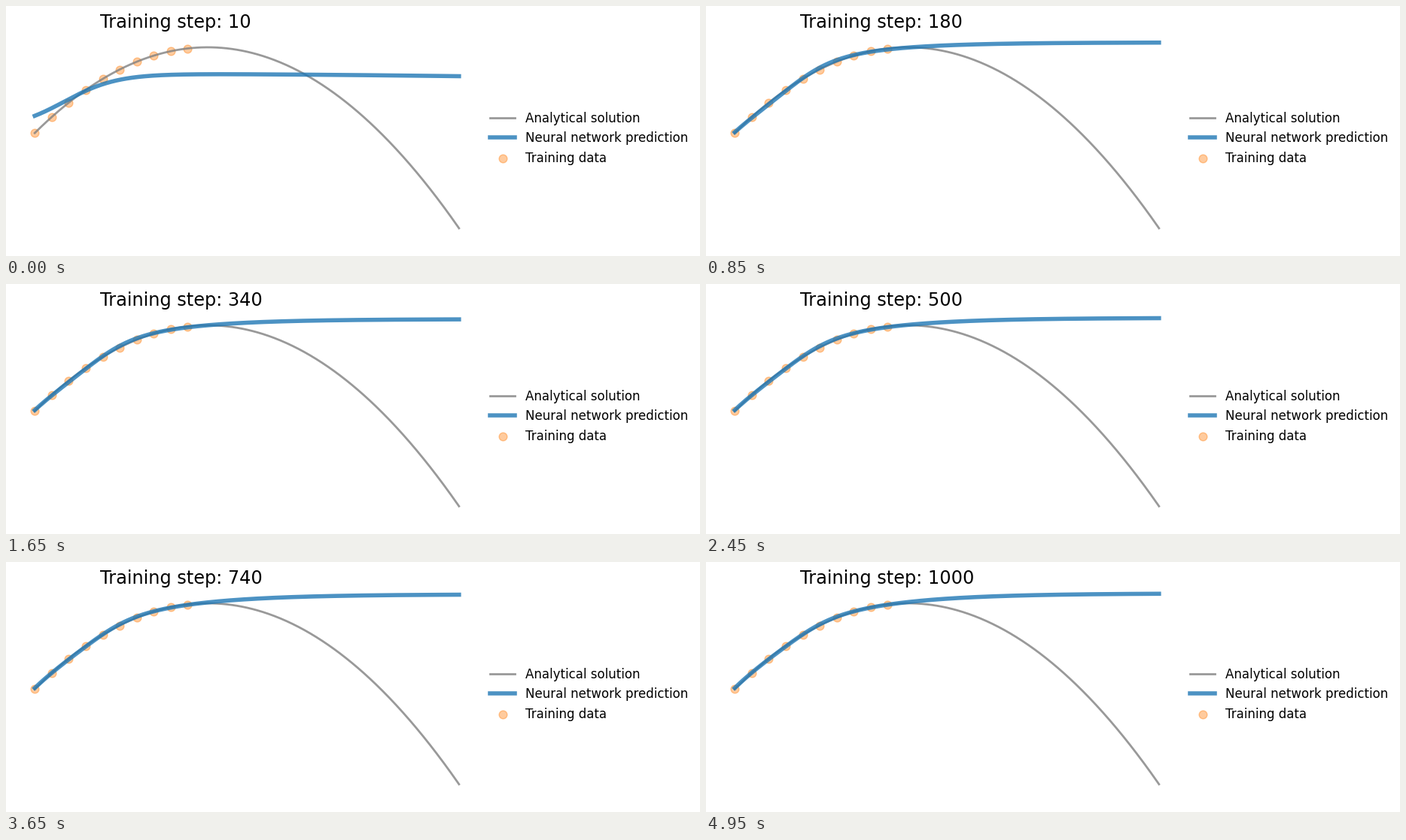
A matplotlib script for the animation above (5 s loop, 922x333 px).

```python
import numpy as np
import matplotlib.pyplot as plt
from matplotlib.animation import FuncAnimation

W, H, DPI = 922, 333, 100
FRAMES, INTERVAL = 100, 50
STEPS_PER_FRAME = 10
SETTLED, LAST = 180, FRAMES * STEPS_PER_FRAME

plt.rcParams["font.family"] = "DejaVu Sans"


def drop(u, centre, width):
    """Sigmoid falling from 1 to 0."""
    return 1 / (1 + np.exp((u - centre) / width))


# Heights are in pixels from the top of the stage.
u = np.linspace(0, 1, 500)
exact = 55 + 687 * (u - 0.4077) ** 2
first_guess = 90 + 3.5 * u**2 + 74.5 * drop(u, 0.07, 0.062)
rough_fit = 48.7 + 46 * drop(u, 0.14, 0.05) + 76 * np.exp(-6 * u)
final_fit = 41.8 + 27 * drop(u, 0.15, 0.045) + 100 * np.exp(-5.3 * u)


def prediction(step):
    # Slow refinement of the fit
    x = np.clip((step - SETTLED) / (LAST - SETTLED), 0, 1)
    t = 1 - (1 - x) ** 1.45
    fit = rough_fit + t * (final_fit - rough_fit)
    # Fast approach with a damped overshoot
    age = step - STEPS_PER_FRAME
    error = np.exp(-age / 30) * np.cos(np.pi * age / 35)
    return fit + error * (first_guess - rough_fit)


fig = plt.figure(figsize=(W / DPI, H / DPI), dpi=DPI, facecolor="white")
ax = fig.add_axes([10 / W, 10 / H, 620 / W, 308 / H])
ax.set_xlim(-0.05, 1.05)
ax.set_ylim(323, 15)
ax.axis("off")

ax.plot(u, exact, color="grey", lw=2, alpha=0.8, label="Analytical solution")
curve, = ax.plot(u, first_guess, color="tab:blue", lw=4, alpha=0.8,
                 label="Neural network prediction")
ax.scatter(u[:200:20], exact[:200:20], s=60, color="tab:orange", alpha=0.4,
           label="Training data")
ax.legend(loc=(1.01, 0.34), frameon=False, fontsize="large")
title = fig.text(125 / W, 304 / H, "", fontsize="xx-large", color="k")


def update(frame):
    step = (frame + 1) * STEPS_PER_FRAME
    curve.set_ydata(prediction(step))
    title.set_text(f"Training step: {step}")
    return curve, title


anim = FuncAnimation(fig, update, frames=FRAMES, interval=INTERVAL,
                     repeat=True, repeat_delay=0)
plt.show()
```
